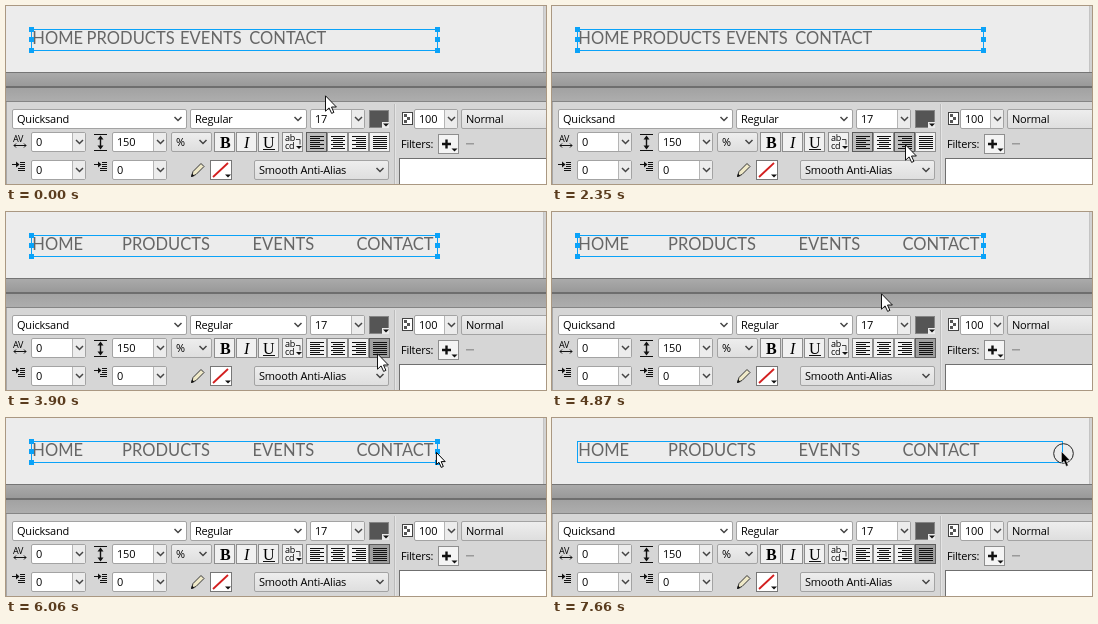
Recreate the animation shown at these times as an HTML page. Size 540 by 178 pixels, loop 8000 ms.

```html
<!DOCTYPE html>
<html lang="en">
<head>
<meta charset="utf-8">
<title>Justified menu text</title>
<style>
html, body { margin: 0; width: 100%; height: 100%; overflow: hidden; background: #d6d6d6; }
svg { display: block; width: 540px; height: 178px; }
text { font: 11px "Open Sans", "Noto Sans", sans-serif; letter-spacing: -.22px; fill: #000; white-space: pre; }
.menu { font: 400 16.5px Lato, sans-serif; letter-spacing: .05px; fill: #666; }
.tip { font-size: 12px; letter-spacing: -.2px; fill: #484848; }
.serif { font: 16px "Liberation Serif", serif; letter-spacing: 0; }
.small { font-size: 9px; }
</style>
</head>
<body>
<svg id="stage" viewBox="0 0 540 178"></svg>
<script>
const LOOP = 8000, BLUE = '#0aa2f8';
const stage = document.getElementById('stage');

function el(tag, attrs, parent = stage, content) {
  const node = document.createElementNS('http://www.w3.org/2000/svg', tag);
  set(node, attrs);
  if (content !== undefined) node.textContent = content;
  return parent.appendChild(node);
}
function set(node, attrs) {
  for (const k in attrs) node.setAttribute(k, attrs[k]);
}
const show = (node, on) => set(node, { visibility: on ? 'visible' : 'hidden' });
const fill = (x, y, width, height, color, parent) =>
  el('rect', { x, y, width, height, fill: color }, parent);
const frame = (x, y, w, h, color, stroke, rx = 0) =>
  el('rect', { x: x + .5, y: y + .5, width: w - 1, height: h - 1, fill: color, stroke, rx });
const line = (d, stroke = '#111', width = 1, parent) =>
  el('path', { d, fill: 'none', stroke, 'stroke-width': width }, parent);
const shape = (d, color = '#111') => el('path', { d, fill: color });
const label = (x, y, s, cls = '') => el('text', { x, y, class: cls }, stage, s);
const chevron = (x, y) => line(`M${x - 3.5} ${y - 2}l3.5 3.5l3.5 -3.5`, '#444', 1.5);
const corner = (x, y) => shape(`M${x - 3} ${y - 2}h6l-3 3z`);

function gradient(id, top, bottom) {
  const g = el('linearGradient', { id, x2: 0, y2: 1 });
  el('stop', { 'stop-color': top }, g);
  el('stop', { offset: 1, 'stop-color': bottom }, g);
}
function combo(x, y, w, s, color = '#fff', split = false) {
  frame(x, y, w, 20, color, '#a3a3a3', 1.5);
  if (split) {
    fill(x + w - 13, y + 1, 12, 18, '#ececec');
    fill(x + w - 14, y + 1, 1, 18, '#b5b5b5');
  }
  label(x + 5, y + 13.7, s);
  chevron(x + w - (split ? 6.5 : 9), y + 10);
}
const button = (x, y, w = 21, h = 20) => frame(x, y, w, h, '#f1f1f1', '#8e8e8e');

// Canvas area and panel bars
gradient('bar', '#aaaaaa', '#999999');
gradient('head', '#a2a2a2', '#adadad');
gradient('soft', '#eeeeee', '#dedede');
fill(0, 0, 540, 66, '#ececec');
fill(537, 0, 1, 66, '#c4c4c4');
fill(538, 0, 2, 66, '#d2d2d2');
fill(0, 66, 540, 1, '#757575');
fill(0, 67, 540, 13, 'url(#bar)');
fill(0, 80, 540, 2, '#6e6e6e');
fill(0, 82, 540, 13, 'url(#head)');
fill(0, 95, 540, 1, '#858585');
fill(0, 96, 540, 82, '#d6d6d6');
fill(0, 96, 1, 82, '#a8a8a8');
fill(388, 98, 1, 80, '#bcbcbc');
fill(389, 98, 1, 80, '#e4e4e4');

// First row
combo(6, 103, 175, 'Quicksand');
combo(184, 103, 117, 'Regular');
combo(304, 103, 55, '17', '#fff', true);
frame(363, 104, 20, 18, '#555', '#858585');
fill(376, 116, 7, 6, '#ececec');
corner(380, 119.5);
frame(396, 106, 11, 13, '#fff', '#444');
for (let i = 0; i < 3; i++) fill(398 + i % 2 * 3, 108 + i * 3, 3, 3, '#555');
combo(408, 103, 44, '100', '#fff', true);
combo(455, 103, 110, 'Normal', 'url(#soft)');

// Second row
label(7, 136, 'AV', 'small');
line('M8 139.5h12M10 137.5l-2 2l2 2M18 137.5l2 2l-2 2');
combo(25, 126, 55, '0', '#fff', true);
line('M88 128.5h13M88 144.5h13');
line('M94.5 131v11', '#111', 1.4);
shape('M94.5 129.5l3 4h-6zM94.5 143.5l3 -4h-6z');
combo(106, 126, 55, '150', '#fff', true);
combo(165, 126, 41, '%', 'url(#soft)');
[['B', 'bold', 'normal', 214], ['I', 'normal', 'italic', 238], ['U', 'normal', 'normal', 257]]
  .forEach(([s, weight, style, x], i) => {
    button(208 + i * 22, 126);
    label(x, 142, s, 'serif').style.cssText = `font-weight:${weight};font-style:${style}`;
  });
line('M257 143.5h12');
button(276, 126);
label(279, 135, 'ab', 'small');
label(279, 143, 'cd', 'small');
line('M290 133.5h4v5', '#444');
corner(293, 142);

const alignX = i => 300 + i * 21;
const aligns = [0, 1, 2, 3].map(i => {
  const b = button(alignX(i), 126);
  for (let k = 0; k < 7; k++) {
    const w = i === 3 || k % 2 === 0 ? 14 : 10;
    fill(alignX(i) + 4 + [0, (14 - w) / 2, 14 - w, 0][i], 130 + k * 2, w, 1, '#111');
  }
  return b;
});
label(395, 142, 'Filters:');
frame(432, 128, 21, 20, '#f4f4f4', '#8e8e8e');
line('M436 138h9M440.5 133.5v9', '#111', 2.4);
corner(448.5, 144.5);
fill(460, 137, 8, 1.5, '#9a9a9a');

// Third row
function indent(x) {
  line(`M${x} 158.5h6M${x + 8} 156.5h5M${x + 8} 158.5h5M${x + 8} 160.5h5M${x + 6} 162.5h7M${x + 6} 164.5h7`);
  shape(`M${x + 4} 155.5l3.5 3l-3.5 3z`);
}
indent(6);
combo(25, 154, 55, '0', '#fff', true);
indent(88);
combo(106, 154, 55, '0', '#fff', true);
el('path', { d: 'M185.5 170.5l1.5 -5l8 -8l3 3l-8 8z', fill: '#efe9c8', stroke: '#333' });
shape('M185 171l1 -3.5l2.5 2.5z');
frame(204, 154, 22, 20, '#fff', '#777');
line('M207 171L222 157', '#d31f1f', 1.8);
corner(222, 170.5);
combo(248, 154, 135, 'Smooth Anti-Alias', 'url(#soft)');
frame(393, 152, 160, 40, '#fff', '#6f6f6f');

// Menu text and its selection
const left = [26.3, 80.6, 174, 243.2], spread = [26.3, 116, 246.5, 350.5];
const words = ['HOME', 'PRODUCTS', 'EVENTS', 'CONTACT'].map((s, i) => label(left[i], 38.3, s, 'menu'));
const box = el('rect', { x: 25.5, y: 23.5, height: 21, fill: 'none', stroke: BLUE });
const handles = el('g', {});
for (const x of [23, 429]) for (const y of [21, 31, 42]) fill(x, y, 5, 5, BLUE, handles);

// Tooltip, click ring, pointers
const tip = el('g', {});
fill(374, 163, 113, 20, '#8f8f8f', tip);
el('rect', { x: 371.5, y: 159.5, width: 112, height: 22, fill: '#fff', stroke: '#767676' }, tip);
el('text', { x: 377, y: 174, class: 'tip' }, tip, 'Justified alignment');
const ring = el('circle', { r: 9.8, fill: 'none', stroke: '#222' });
const arrow = el('path', { d: 'M.5 .8V16.2L4.1 12.9L6.6 18.4L8.9 17.4L6.5 12H11.4Z', fill: '#fff', stroke: '#111' });
const tool = el('path', { d: 'M.4 .4V12.6L3 10.3L5.2 15.4L7.3 14.5L5.2 9.6H9.2Z' });

// Pointer tip: time, x, y
const path = [
  [0, 319, 89], [120, 308, 72], [230, 291, 47], [330, 284, 37],
  [1900, 280, 34], [2010, 287, 50], [2120, 305, 80], [2240, 332, 113], [2350, 353, 138],
  [2470, 360, 141], [2590, 364, 141], [2720, 368, 141], [2830, 371, 141],
  [4620, 346, 114], [4740, 318, 87], [4870, 329, 81], [5000, 350, 72], [5110, 376, 61],
  [5230, 401, 49], [5350, 415, 43], [5470, 421, 40], [5590, 426, 37], [5710, 429, 35], [6060, 430, 34]
];
const DRAG = 6790, DRAG_STEP = 108.5;

function pointer(t) {
  if (t < DRAG) {
    const [, x, y] = path.filter(p => p[0] <= t).pop();
    return [x, y];
  }
  const u = Math.min(1, (Math.floor((t - DRAG) / DRAG_STEP) + 1) / 8);
  const ease = u * u * (3 - 2 * u);
  return [Math.round(430 + 79 * ease), Math.round(34 - ease + 3.5 * Math.sin(Math.PI * u))];
}

function draw(t) {
  const within = (a, b) => t >= a && t < b;
  const [x, y] = pointer(t);
  const justified = t >= 3900, dragging = t >= DRAG;

  words.forEach((w, i) => set(w, { x: (justified ? spread : left)[i] }));
  const edge = dragging ? x + (t < 7660 ? -.5 : 1.5) : 431.5;
  set(box, { width: edge - 25.5 });
  show(handles, !dragging);

  const picked = justified ? 3 : 0;
  aligns.forEach((b, i) => {
    const hover = y >= 126 && y < 147 && x >= alignX(i) && x < alignX(i) + 21;
    const on = i === picked || hover;
    set(b, {
      fill: !on ? '#f1f1f1' : i === 3 ? '#9f9f9f' : '#bdbdbd',
      stroke: on ? '#5c5c5c' : '#8e8e8e'
    });
  });

  show(tip, within(3050, 3780));
  show(ring, within(1200, 1410) || within(3780, 3900) || t >= 6560);
  set(ring, { cx: x + 2.5, cy: y + 2.5 });

  // The tool pointer turns hollow over a handle
  const onCanvas = y < 66, hollow = within(6060, 6560);
  show(tool, onCanvas);
  show(arrow, !onCanvas);
  set(tool, hollow
    ? { fill: '#fff', stroke: '#000', 'stroke-width': 1 }
    : { fill: '#000', stroke: '#fff', 'stroke-width': .5 });
  set(onCanvas ? tool : arrow, { transform: `translate(${x} ${y})` });
}

function tick() {
  draw(performance.now() % LOOP);
  requestAnimationFrame(tick);
}
tick();
</script>
</body>
</html>
```
